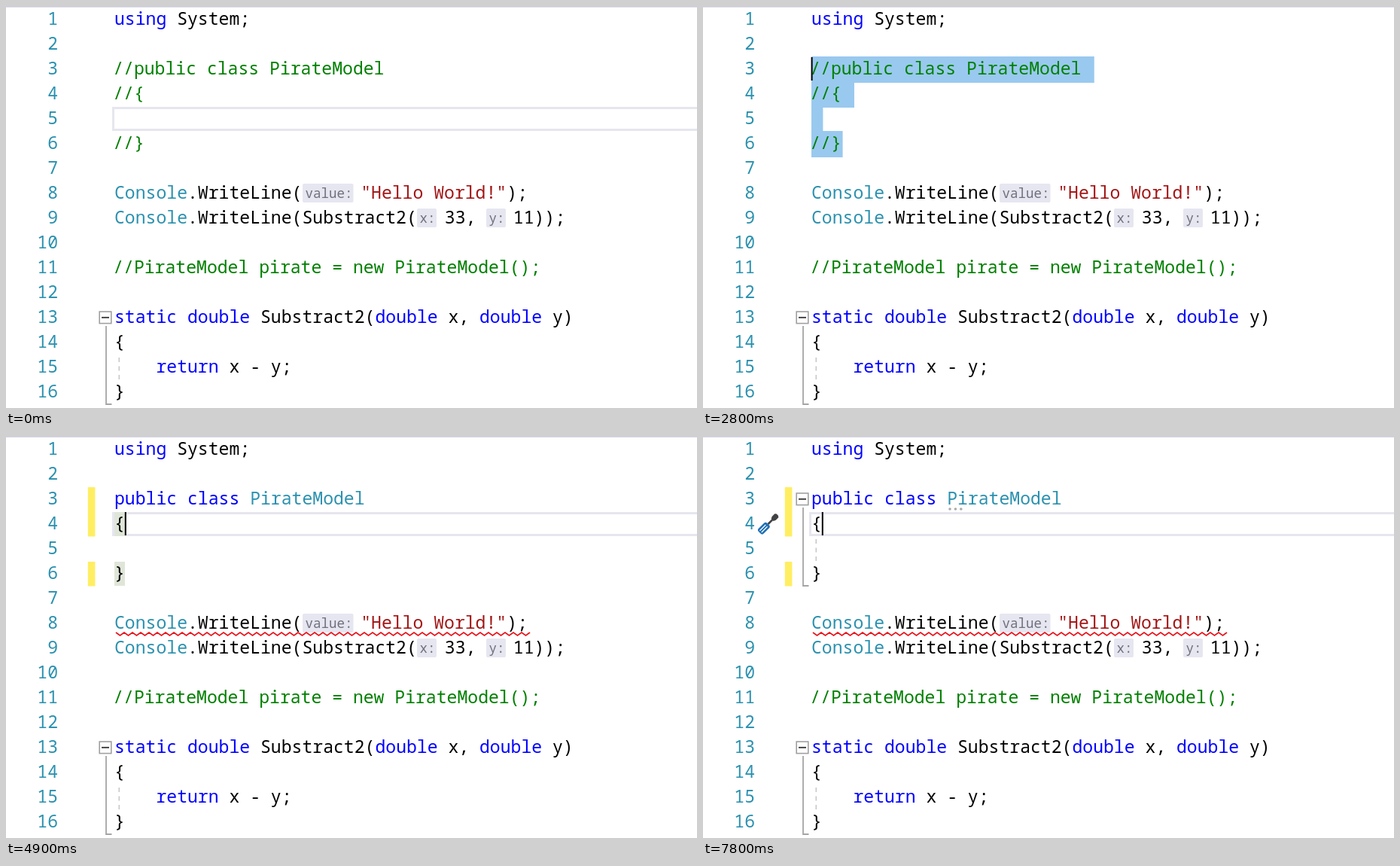
Write an HTML page that moves like this. It is 918 px wide and 534 px high and loops after 8 s.

```html
<!DOCTYPE html>
<html lang="en">
<head>
<meta charset="utf-8">
<title>Uncommenting a class</title>
<style>
  html, body { margin: 0; width: 100%; height: 100%; overflow: hidden; background: #fff; }
  svg { display: block; width: 918px; height: 534px; }
  text { font: 23.1px "Noto Sans Mono", "DejaVu Sans Mono", monospace; white-space: pre; }
  .hint { font-size: 17.5px; }
  .tip { font: 18px "Open Sans", "Noto Sans", sans-serif; }
</style>
</head>
<body>
<svg id="stage" viewBox="0 0 918 534"></svg>
<script>
const LOOP = 8000, LEFT = 144, STEP = 33, ADVANCE = 13.86, NEWLINE = 15.4;
const SLANT = 1.8; // pulls italic text back to the left edge
const INK = { k: '#0000ff', t: '#2b91af', c: '#008000', s: '#a31515', n: '#000' };
const stage = document.getElementById('stage');

const rect = (x, y, w, h, fill, extra = '') =>
  `<rect x="${x}" y="${y}" width="${w}" height="${h}" fill="${fill}" ${extra}/>`;
const path = (d, stroke, width, extra = '') =>
  `<path d="${d}" fill="none" stroke="${stroke}" stroke-width="${width}" ${extra}/>`;
const rowTop = n => 1 + STEP * (n - 1);

// Tokens are pairs of ink key and text.
function code(n, tokens, x = LEFT) {
  const italic = tokens[0][0] === 'c';
  const spans = tokens.map(([ink, s]) => `<tspan fill="${INK[ink]}">${s}</tspan>`);
  return `<text x="${italic ? x - SLANT : x}" y="${25 + STEP * (n - 1)}"` +
    `${italic ? ' font-style="italic"' : ''}>${spans.join('')}</text>`;
}

function hint(n, x, w, s) {
  const y = rowTop(n) + 4;
  return rect(x, y, w, 25, '#e6e6f1', 'rx="2"') +
    `<text class="hint" x="${x + 3.5}" y="${y + 19}" fill="#70707c">${s}</text>`;
}

function fold(first, last) {
  const y = rowTop(first) + 9, end = rowTop(last) + 33;
  return rect(124.2, y, 15.6, 15.6, '#fff', 'stroke="#a0a0a0" stroke-width="1.6"') +
    path(`M127 ${y + 7.8}h10`, '#333', 1.8) +
    path(`M133 ${y + 19}V${end}H140.5`, '#a5a5a5', 1.8) +
    path(`M150.3 ${end - 62}v30`, '#c8c8c8', 1.6, 'stroke-dasharray="6 5.5"');
}

function screwdriver(n) {
  return `<g transform="translate(86.5 ${rowTop(n) + 17}) rotate(-45)">` +
    path('M0 0H10', '#424242', 2.6) +
    '<path d="M8 -2.2L11 -3.5H16L17.5 -1.5V1.5L16 3.5H11L8 2.2Z" fill="#424242"/>' +
    rect(-16, -4.8, 16, 9.6, '#1f6fb5', 'rx="3"') +
    path('M-14 -1.6H-3M-14 1.6H-3', '#fff', 1.2) + '</g>';
}

function squiggle(x, end) {
  let d = `M${x} 261`;
  for (let i = 1; x + i * 5.5 <= end; i++) d += `L${x + i * 5.5} ${i % 2 ? 265 : 261}`;
  return path(d, '#e8121a', 1.7);
}

function selection(from, widths, fill) {
  let out = '';
  for (let n = from; n <= 6; n++)
    out += rect(LEFT, rowTop(n), widths[n] * ADVANCE + (n < 6 ? NEWLINE : 0), 35, fill);
  return out;
}

const caret = (n, x) => rect(x, rowTop(n) + 1, 2, 31, '#000');
const currentLine = n =>
  rect(142.5, rowTop(n) + 2.5, 800, 29, 'none', 'stroke="#e6e6f0" stroke-width="3"');

function tooltip() {
  const lines = ['CS8803: Top-level statements must precede',
    'namespace and type declarations.', '', 'Show potential fixes (Alt+Enter or Ctrl+.)'];
  return rect(342.5, 266.5, 488, 135, '#f7f7f7', 'stroke="#cccedb"') +
    lines.map((s, i) => `<text class="tip" x="356" y="${295 + i * 29}" fill="${i > 2 ? '#0e70c0' : '#1e1e1e'}">${s}</text>`).join('');
}

let numbers = '';
for (let n = 1; n <= 16; n++)
  numbers += `<text x="69" y="${25 + STEP * (n - 1)}" text-anchor="end" fill="#2b91af">${n}</text>`;

const fixed = rect(0, 0, 918, 1.8, '#cfcfdb') + numbers +
  code(1, [['k', 'using'], ['n', ' System;']]) +
  code(8, [['t', 'Console'], ['n', '.WriteLine(']]) + hint(8, 394, 67.5, 'value:') +
  code(8, [['s', '"Hello World!"'], ['n', ');']], 471.2) +
  code(9, [['t', 'Console'], ['n', '.WriteLine(Substract2(']]) + hint(9, 546, 26, 'x:') +
  code(9, [['n', '33,']], 582.8) + hint(9, 638, 26, 'y:') + code(9, [['n', '11));']], 673.8) +
  code(11, [['c', '//PirateModel pirate = new PirateModel();']]) +
  code(13, [['k', 'static double'], ['n', ' Substract2('], ['k', 'double'], ['n', ' x, '],
    ['k', 'double'], ['n', ' y)']]) +
  code(14, [['n', '{']]) + code(15, [['k', '    return'], ['n', ' x - y;']]) +
  code(16, [['n', '}']]) + fold(13, 16);

function carets(t) {
  const on = (a, b) => t >= a && t < b;
  if (on(1100, 1900)) return caret(Math.max(2, 5 - Math.floor((t - 1100) / 100)), 143.6);
  if (on(1900, 2400) || on(2800, 3400)) return caret(3, 143.6);
  if (on(4200, 4600)) return caret(6, 157.8);
  if (on(4800, 5400) || on(5900, 6300) || on(6900, 7400) || t >= 7800) return caret(4, 157.8);
  return '';
}

function draw(t) {
  const on = (a, b = LOOP) => t >= a && t < b;
  const open = on(4200);
  let out = rect(0, 0, 918, 534, '#fff');

  if (on(0, 1100)) out += currentLine(5);
  if (on(4800)) out += currentLine(4);
  if (on(1100, 4800)) {
    const from = t < 1400 ? 5 - Math.floor((t - 1100) / 100) : t < 1900 ? 2 : 3;
    const widths = open ? { 3: 24, 4: 1, 5: 0, 6: 1 } : { 2: 0, 3: 26, 4: 3, 5: 0, 6: 3 };
    out += selection(from, widths, on(3800, 4200) ? '#e5ebf1' : '#99c9ef');
  }
  if (on(4900, 5200))
    out += rect(144, 101, 14, 32, '#dfe6d8') + rect(144, 167, 14, 32, '#dfe6d8');
  if (open) out += rect(108.8, 68, 9.6, 65.5, '#ffee62') + rect(108.8, 167, 9.6, 32.5, '#ffee62');

  if (open) {
    const ink = t < 4300 ? 'c' : 'n';
    out += code(3, [['k', 'public class '], ['t', 'PirateModel']]) +
      code(4, [[ink, '{']]) + code(6, [[ink, '}']]);
  } else {
    out += code(3, [['c', '//public class PirateModel']]) +
      code(4, [['c', '//{']]) + code(6, [['c', '//}']]);
  }
  out += fixed;

  if (on(4600, 4800)) out += screwdriver(6);
  if (on(4900)) out += squiggle(146, 696);
  if (on(5400)) out += screwdriver(4);
  if (on(5600)) out += fold(3, 6);
  if (on(6200))
    for (let i = 0; i < 3; i++) out += `<circle cx="${328 + i * 7.4}" cy="97" r="1.8" fill="#aaa"/>`;
  out += carets(t);
  if (on(6600, 7300)) out += tooltip();
  return out;
}

let shown = '';
const start = performance.now();
function tick() {
  const next = draw((performance.now() - start) % LOOP);
  if (next !== shown) stage.innerHTML = shown = next;
  requestAnimationFrame(tick);
}
tick();
</script>
</body>
</html>
```
